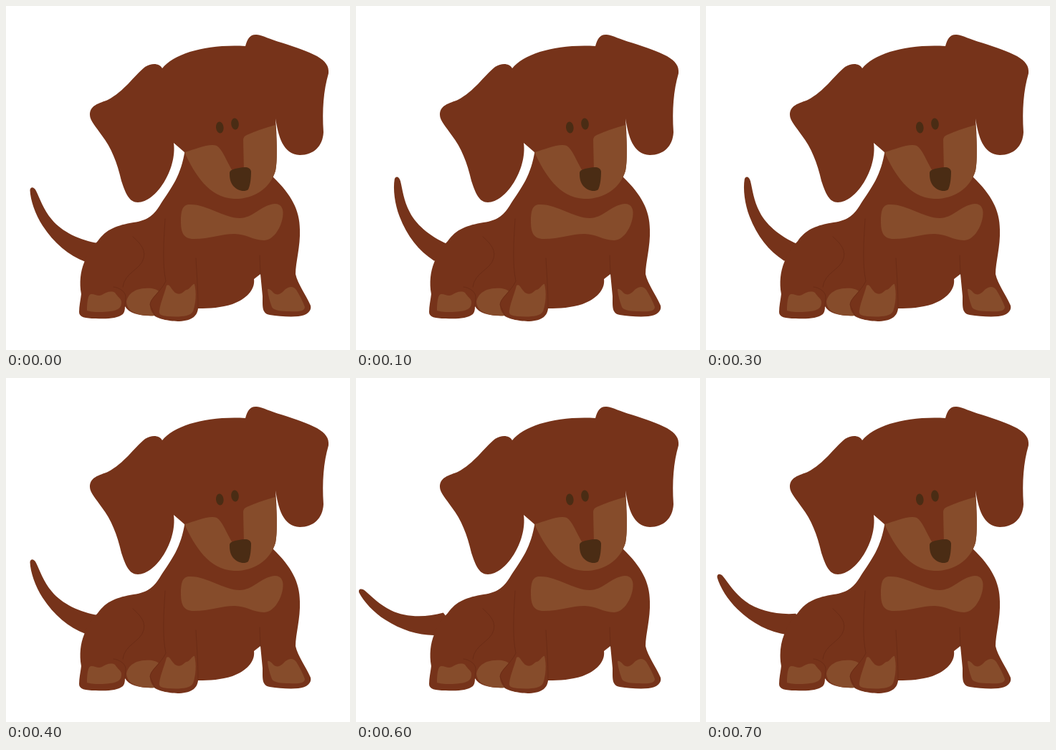
These frames come from a looping animation (480 px wide and 480 px high, 800 ms). An HTML page:

```html
<!DOCTYPE html>
<html lang="en">
<head>
<meta charset="utf-8">
<title>Wagging puppy</title>
<style>
  html, body { margin: 0; width: 100%; height: 100%; overflow: hidden; background: #fff; }
  svg { display: block; width: 100%; height: 100%; }
  .coat { fill: #76331a; }
  .tan { fill: #864c2b; }
  .dark { fill: #4a2c14; }
  .crease { fill: none; stroke: #6b2c16; stroke-width: 1; stroke-linecap: round; }
</style>
</head>
<body>
<svg viewBox="0 0 480 480">
  <g class="coat">
    <path id="tail" d="M33.5 257 C34 252 39 252 42 258 C47 268 52 284 64 298 C78 315 103 327 129 331 L134 352 L111 357 C87 348 67 331 51 306.5 C41 291 34 271 33.5 257 Z"/>
    <!-- body -->
    <path d="M250 200 C244 238 231 253 216 276 C207 291 199 299 178 302 C155 306 140 311 128 328 C119 337 113 347 109 358 C104 370 102 386 105 402 C104 410 102 419 102 427 C102 434 110 436 125 436 C140 437 156 436 163 430 Q166 427 166 419 C172 430 190 433 207 432 C212 437 230 440 242 440 C260 439 267 432 268 422 C285 422 300 421 316 416 C335 409 348 396 346 381 L355 374 L358 405 C358 420 357 429 368 431 C380 433 396 434 408 433 C420 432 427 425 425 418 C418 402 407 388 404 374 C404 358 411 335 410 312 C410 285 398 263 373 239 L340 190 Z"/>
    <!-- head and ears -->
    <path d="M218 87 C235 66 280 53 334 56 C337 45 341 39 350 40 C358 41 370 47 384 51 C406 58 420 63 434 70 C446 77 451 84 450 94 C443 118 441 145 443 176 C442 196 429 208 410 208 C386 207 380 181 376 157 C378 180 379 215 376 230 C368 256 344 270 318 269 C283 267 264 236 249 204 L234 191 C239 228 209 274 184 274 C172 274 167 262 161 244 C155 218 147 198 134 181 C126 169 117 160 117 152 C117 138 130 136 142 131 C165 119 178 98 194 85 C204 79 214 80 218 87 Z"/>
  </g>
  <g class="tan">
    <path d="M249 204 C264 200 284 191 294 195 C302 200 307 215 316 230 L332 230 L331 187 Q331 182 336 180 Q354 172 376 166 C378 195 379 216 376 230 C368 256 344 270 318 269 C283 267 264 236 249 204 Z"/>
    <path d="M244 300 C244 282 248 276 258 277 C280 277 305 296 326 296 C345 296 355 278 375 276 C385 276 388 284 386 295 C383 312 372 327 360 327 C345 327 335 318 319 318 C300 318 285 325 262 325 C247 325 244 315 244 300 Z"/>
    <path d="M113 425 C113 415 114 402 119 402 C125 402 128 406 134 403 C140 399 147 397 152 400 C156 406 160 408 161 412 C162 420 157 425 145 426 C133 428 118 427 113 425 Z"/>
    <path d="M168 413 C170 400 183 394 194 394 C203 393 210 395 213 398 C208 404 201 410 201 417 C201 424 204 429 208 432 C190 433 170 430 168 413 Z"/>
    <path d="M214 425 C216 412 221 402 224 390 C229 386 230 397 238 401 C245 404 248 397 252 396 C257 395 260 387 263 388 C266 400 265 415 261 426 C257 434 240 434 225 433 C217 432 213 431 214 425 Z"/>
    <path d="M365 397 C364 393 369 395 373 400 C380 406 385 400 390 395 C396 391 401 391 405 396 C410 404 414 412 417 420 C417 426 408 427 395 426 C385 426 373 425 371 420 C368 412 366 405 365 397 Z"/>
  </g>
  <g class="dark">
    <path d="M312 234 C311 229 318 227 325 226 C335 224 341 225 342 231 C342 240 341 250 338 256 C333 260 323 258 317 251 C313 246 312 240 312 234 Z"/>
    <ellipse cx="298.3" cy="169.5" rx="5.3" ry="8" transform="rotate(-6 298.3 169.5)"/>
    <ellipse cx="319.5" cy="164.5" rx="5.3" ry="8" transform="rotate(-6 319.5 164.5)"/>
  </g>
  <g class="crease">
    <path d="M177 322 C188 332 195 340 192 352 C188 368 165 372 163 392"/>
    <path d="M150 392 C158 393 166 398 167 405 L166 419"/>
    <path d="M222 297 C220 330 218 360 223 384 C215 400 201 408 201 417 L208 432"/>
    <path d="M265 352 C266 372 268 395 268 421"/>
    <path d="M354 348 L355 374"/>
  </g>
</svg>
<script>
  const STEP = 100;
  const PIVOT = "117.5 346";
  const ANGLES = [0, 12, 25, 12, 0, -13, -24.3, -13];
  const tail = document.getElementById("tail");

  function draw(now) {
    const angle = ANGLES[Math.floor(now / STEP) % ANGLES.length];
    tail.setAttribute("transform", `rotate(${angle} ${PIVOT})`);
  }

  const start = performance.now();
  function tick() {
    draw(performance.now() - start);
    requestAnimationFrame(tick);
  }
  tick();
</script>
</body>
</html>
```
